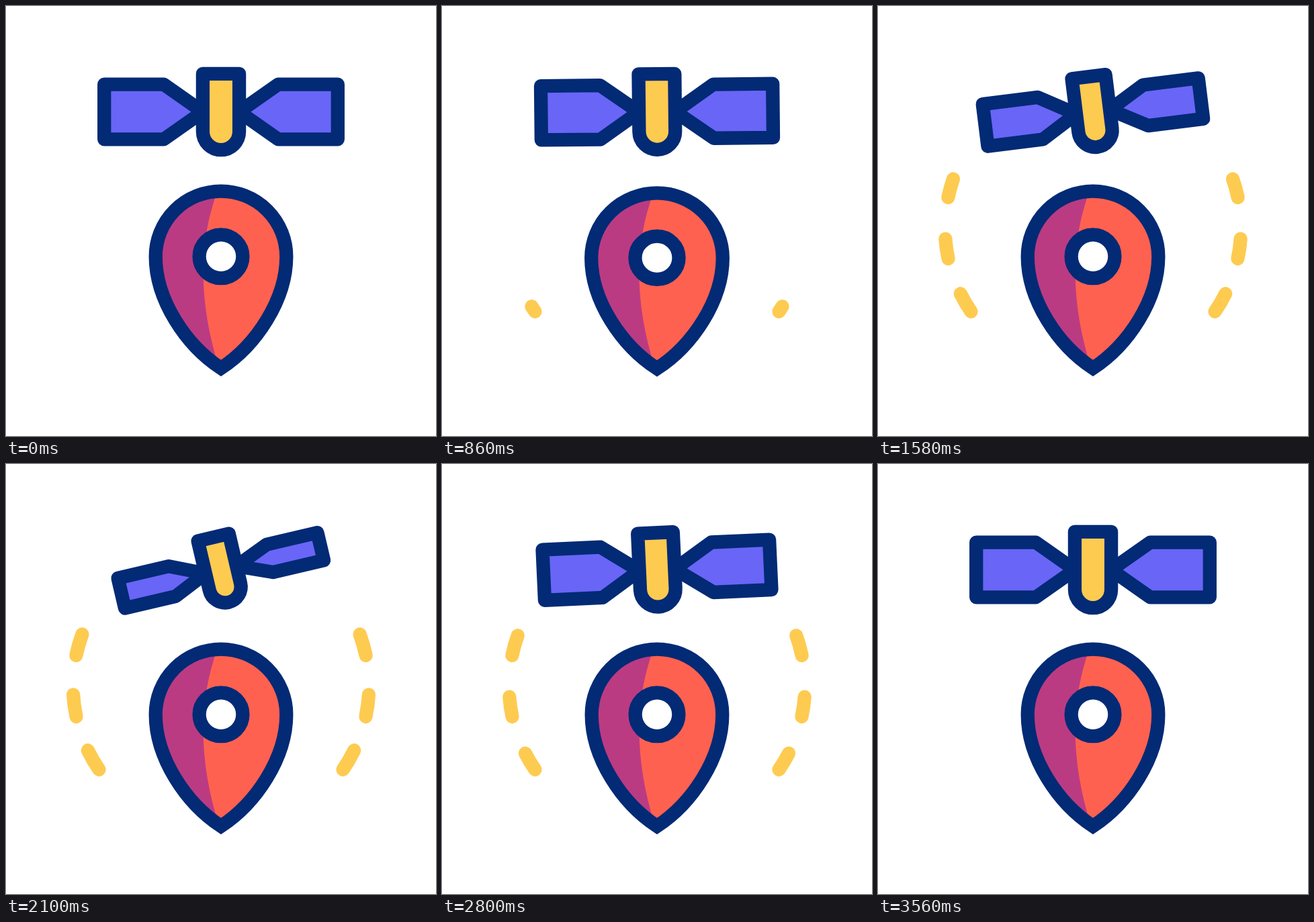
Animation, 640 px wide and 640 px high, one loop 3600 ms. Source, as an HTML page with a canvas:

```html
<!DOCTYPE html>
<html lang="en">
<head>
<meta charset="utf-8">
<title>Satellite and map pin</title>
<style>
  html, body { margin: 0; width: 100%; height: 100%; overflow: hidden; background: #fff; }
  canvas { display: block; width: 640px; height: 640px; }
</style>
</head>
<body>
<canvas id="stage"></canvas>
<script>
const LOOP = 3600, SIZE = 640, LINE = 20.3;
const NAVY = '#032a75', VIOLET = '#6965f7', GOLD = '#fecb51', CORAL = '#ff6150', PLUM = '#bb3b82';

const canvas = document.getElementById('stage');
const ctx = canvas.getContext('2d');
const ratio = window.devicePixelRatio || 1;
canvas.width = canvas.height = SIZE * ratio;
const base = new DOMMatrix([ratio, 0, 0, ratio, 0, 0]);

function bezier(x1, y1, x2, y2) {
  const at = (a, b, t) => 3 * a * t * (1 - t) ** 2 + 3 * b * t * t * (1 - t) + t ** 3;
  return u => {
    if (u <= 0) return 0;
    if (u >= 1) return 1;
    let lo = 0, hi = 1;
    for (let i = 0; i < 24; i++) {
      const mid = (lo + hi) / 2;
      if (at(x1, x2, mid) < u) lo = mid; else hi = mid;
    }
    return at(y1, y2, lo);
  };
}

const smooth = bezier(1 / 3, 0, 2 / 3, 1);
const tiltUp = bezier(1, 0, 0.56, 1);
const tiltDown = bezier(0.35, 0, 0.17, 1);
const grow = bezier(0.1, 0.65, 0.45, 1);
const progress = (t, from, to) => (t - from) / (to - from);

// Shapes are transformed first and stroked afterwards, so line weight stays constant.
function shape(source, matrix) {
  const path = new Path2D();
  path.addPath(source, matrix);
  return path;
}

function outline(path, color = NAVY) {
  ctx.strokeStyle = color;
  ctx.lineWidth = LINE;
  ctx.stroke(path);
}

function paint(path, color) {
  ctx.fillStyle = color;
  ctx.fill(path);
}

// Pin, relative to its tip
const pin = new Path2D('M0 0C-52 -34 -97.3 -101.5 -97.3 -166.1A97.3 97.3 0 0 1 97.3 -166.1C97.3 -101.5 52 -34 0 0Z');
const shade = new Path2D('M-4 -267C-34 -189 -34 -99 -3 -1L-130 -1V-267Z');
const hole = new Path2D();
hole.arc(0, -166.2, 32.4, 0, Math.PI * 2);
hole.closePath();

// Satellite, relative to its centre
const panel = new Path2D('M-173.8 -40.8H-85L-27 0L-85 40.8H-173.8Z');
const body = new Path2D('M-27.1 -56.7H27.1V29.6A27.1 27.1 0 0 1 -27.1 29.6Z');

function drawPin(t) {
  const squash = 1.17 * (t < 600 ? smooth(progress(t, 267, 600)) : 1 - smooth(progress(t, 600, 900)));
  const m = new DOMMatrix()
    .translate(320, 539 + 10.6 * squash)
    .scale(1 + 0.093 * squash, 1 - 0.16 * squash);
  const drop = shape(pin, m), ring = shape(hole, m);
  ctx.lineJoin = 'miter';
  paint(drop, CORAL);
  ctx.save();
  ctx.clip(drop);
  paint(shape(shade, m), PLUM);
  ctx.restore();
  outline(drop);
  paint(ring, '#fff');
  outline(ring);
}

function drawSatellite(t) {
  const s = t < 2080 ? tiltUp(progress(t, 300, 2080)) : 1 - tiltDown(progress(t, 2080, 3520));
  const m = new DOMMatrix()
    .translate(320, 157.5)
    .rotate(-13.2 * s)
    .scale(1 - 0.124 * s ** 0.92);
  const thin = 1 - 0.385 * s ** 1.2;
  ctx.lineJoin = 'round';
  for (const side of [1, -1]) {
    const wing = shape(panel, m.scale(side, thin + side * 0.025 * s));
    paint(wing, VIOLET);
    outline(wing);
  }
  const hull = shape(body, m);
  paint(hull, GOLD);
  outline(hull);
}

// Lower end of each dash in degrees below the horizontal, lowest dash first
const DASHES = [34.5, 12.05, -11.8];

function drawSignal(t) {
  const rad = Math.PI / 180;
  ctx.lineCap = 'round';
  DASHES.forEach((end, i) => {
    const delay = 90 * i;
    const length = Math.min(grow((t - 780 - delay) / 1300), grow((3360 + delay - t) / 1200));
    if (length <= 0) return;
    const arc = new Path2D();
    arc.arc(0, 0, 220.3, (180 - end) * rad, (180 - end + 8.6 * length) * rad);
    for (const side of [1, -1]) {
      outline(shape(arc, new DOMMatrix([side, 0, 0, 1, 320, 330])), GOLD);
    }
  });
}

function draw(now) {
  const t = now % LOOP;
  ctx.setTransform(base);
  ctx.fillStyle = '#fff';
  ctx.fillRect(0, 0, SIZE, SIZE);
  drawSignal(t);
  drawPin(t);
  drawSatellite(t);
}

const start = performance.now();
function tick() {
  draw(performance.now() - start);
  requestAnimationFrame(tick);
}
tick();
</script>
</body>
</html>
```
